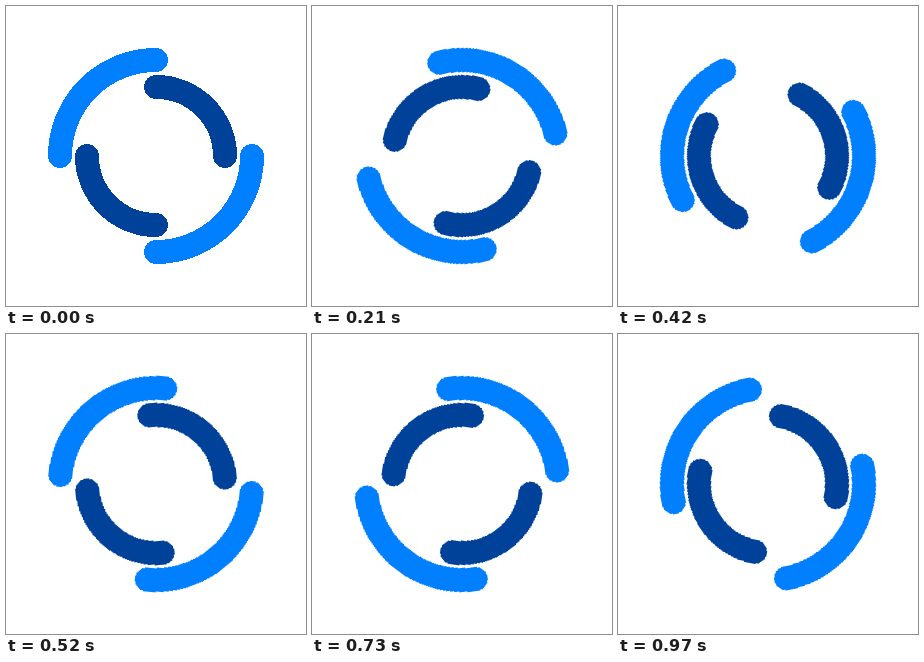
Animation of 300 by 300 pixels, one loop 1 s. Source, as an HTML page:

```html
<!DOCTYPE html>
<html lang="en">
<head>
<meta charset="utf-8">
<title>Loading</title>
<style>
  html, body { margin: 0; width: 100%; height: 100%; overflow: hidden; background: #fff; }
  svg { display: block; width: 100%; height: 100%; }
  path { fill: none; stroke-width: 24; stroke-linecap: round; shape-rendering: crispEdges; }
  g { transform-origin: 150px 150px; }
</style>
</head>
<body>
<svg viewBox="0 0 300 300">
  <g id="outer" stroke="#007fff">
    <path d="M246 150A96 96 0 0 1 150 246M54 150A96 96 0 0 1 150 54"/>
  </g>
  <g id="inner" stroke="#004299">
    <path d="M150 81A69 69 0 0 1 219 150M150 219A69 69 0 0 1 81 150"/>
  </g>
</svg>
<script>
  const STEPS = 33;
  const LOOP = 1000;

  // One turn in equal hard steps, each starting on a 10 ms tick.
  function spin(id, turn) {
    const frames = Array.from({ length: STEPS + 1 }, (_, i) => ({
      offset: Math.round(i * 100 / STEPS) / 100,
      transform: `rotate(${turn * i / STEPS}deg)`,
      easing: 'step-end'
    }));
    document.getElementById(id).animate(frames, { duration: LOOP, iterations: Infinity });
  }

  spin('outer', 360);
  spin('inner', -360);
</script>
</body>
</html>
```
